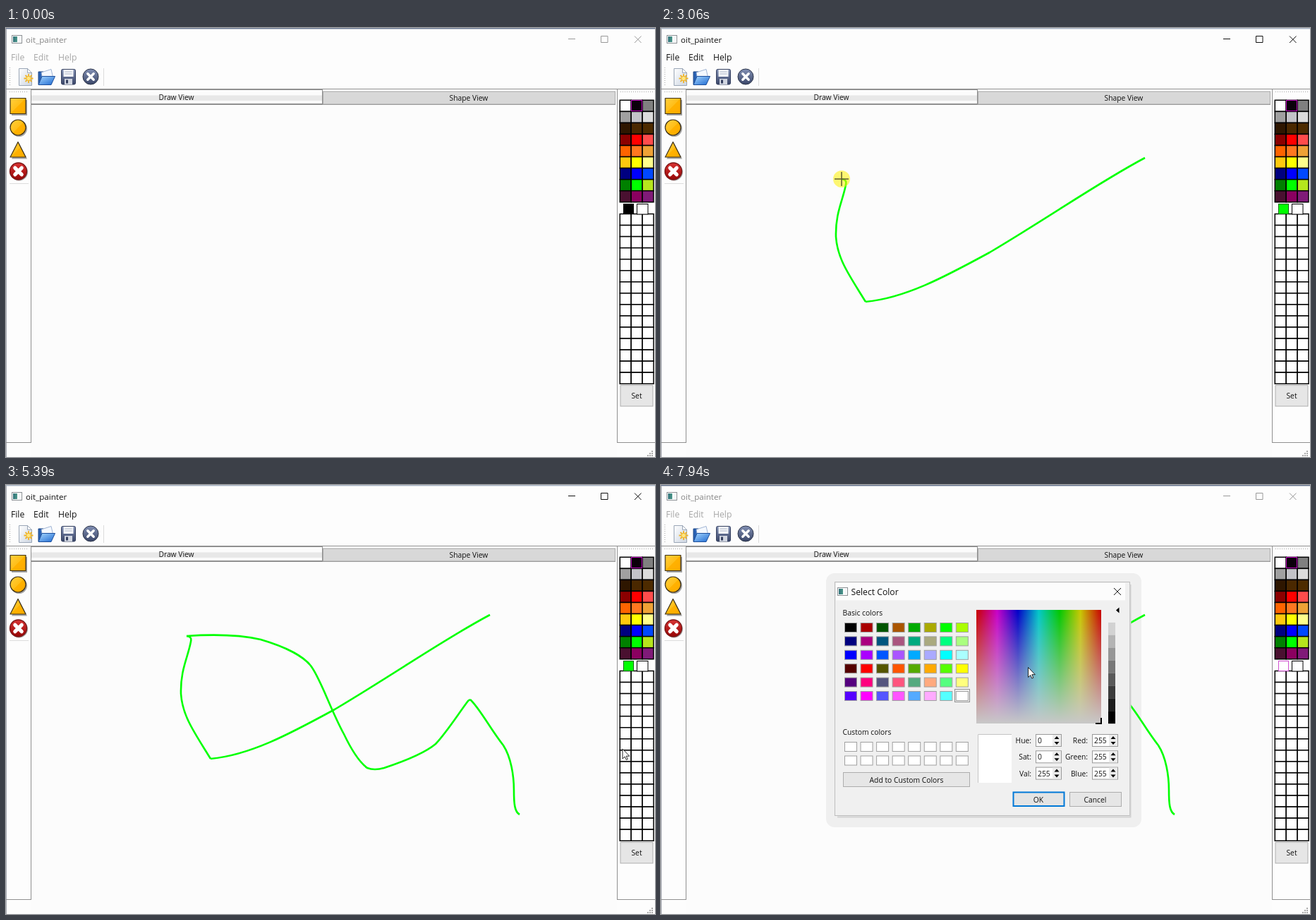
An HTML page for the animation above (8 s loop, 920x608 px).

```html
<!DOCTYPE html>
<html lang="en">
<head>
<meta charset="utf-8">
<title>Painter</title>
<style>
  html, body { margin: 0; width: 100%; height: 100%; overflow: hidden; background: #fdfdfd; }
  svg { display: block; width: 920px; height: 608px; }
  text { font: 10.3px "Open Sans", "Noto Sans", sans-serif; fill: #111; }
  .mid { text-anchor: middle; }
  .end { text-anchor: end; }
  .title { font-size: 11.6px; }
  .menu, .caption { font-size: 12.2px; }
  .chrome { fill: none; stroke: #111; }
  .off .title { fill: #858585; }
  .off .menu { fill: #a6a6a6; }
  .off .chrome { stroke: #999; }
  #edge { fill: #a9b4c4; }
  .off #edge { fill: #66748e; }
  .dots { stroke: #a8a8a8; stroke-dasharray: 1 2; }
  .rule { stroke: #909090; }
  .soft { stroke: #dcdcdc; }
  .btn { fill: #e6e6e6; stroke: #adadad; }
  .hot .btn { fill: #dcecf9; stroke: #3c8fd0; }
</style>
</head>
<body>
<svg id="stage" viewBox="0 0 920 608">
  <defs>
    <linearGradient id="gold" x2="1" y2="1">
      <stop stop-color="#ffd040"/><stop offset=".5" stop-color="#ffbe18"/>
      <stop offset=".5" stop-color="#ffb200"/><stop offset="1" stop-color="#ffaa00"/>
    </linearGradient>
    <linearGradient id="blue" x2="1" y2="1">
      <stop stop-color="#a8d8ff"/><stop offset="1" stop-color="#1c68d0"/>
    </linearGradient>
    <linearGradient id="steel" x2="0" y2="1">
      <stop stop-color="#8290b4"/><stop offset="1" stop-color="#3a4668"/>
    </linearGradient>
    <linearGradient id="paper" x2="1" y2="1">
      <stop stop-color="#fff"/><stop offset="1" stop-color="#ccd5e2"/>
    </linearGradient>
    <linearGradient id="red" x2="0" y2="1">
      <stop stop-color="#d83434"/><stop offset="1" stop-color="#960606"/>
    </linearGradient>
    <linearGradient id="app" x2="1">
      <stop stop-color="#2f6f78"/><stop offset=".55" stop-color="#4f9a8c"/>
      <stop offset=".55" stop-color="#fff"/><stop offset="1" stop-color="#eef2f4"/>
    </linearGradient>
    <linearGradient id="hue">
      <stop stop-color="#c80000"/><stop offset=".1667" stop-color="#c800c8"/>
      <stop offset=".3333" stop-color="#0000c8"/><stop offset=".5" stop-color="#00c8c8"/>
      <stop offset=".6667" stop-color="#00c800"/><stop offset=".8333" stop-color="#c8c800"/>
      <stop offset="1" stop-color="#c80000"/>
    </linearGradient>
    <linearGradient id="fade" x2="0" y2="1">
      <stop stop-color="#c8c8c8" stop-opacity="0"/><stop offset="1" stop-color="#c8c8c8"/>
    </linearGradient>
    <g id="icon">
      <rect x=".5" y=".5" width="14" height="11" fill="#fff" stroke="#8b9094"/>
      <rect x="2" y="2" width="11" height="8" fill="url(#app)"/>
    </g>
  </defs>

  <rect width="920" height="608" fill="#fdfdfd"/>
  <rect x="36" y="110" width="830" height="498" fill="#fcfcfc"/>
  <rect id="edge" width="920" height="1.4"/>
  <path d="M.5 1V608" stroke="#a9adb5"/>

  <use href="#icon" x="8" y="10"/>
  <text class="title" x="28" y="20.800">oit_painter</text>
  <path class="chrome" d="M797 15.500h10M843.500 11.500h9.500v9h-9.500zM891 11.500l9.500 9.500M900.500 11.500l-9.500 9.500"/>
  <text class="menu" x="7" y="46">File</text>
  <text class="menu" x="39" y="46">Edit</text>
  <text class="menu" x="74" y="46">Help</text>

  <path class="dots" d="M5.500 56V83M871 90.500H917M5 90.500H31"/>
  <path class="soft" d="M138.500 57V82M5 220.500H32"/>

  <g stroke-linejoin="round">
    <path d="M18.500 57.500h12l6 6v18h-18z" fill="url(#paper)" stroke="#9aa6b6"/>
    <path d="M30.500 57.500v6h6z" fill="#fff" stroke="#9aa6b6"/>
    <path d="M32 65v13M25.500 71.500h13M27.500 67l9 9M36.500 67l-9 9" stroke="#f0b429" stroke-width="1.800"/>
    <circle cx="32" cy="71.500" r="3.200" fill="#ffe680" stroke="#f0b429"/>

    <path d="M46 80V62h7l2 2h8v5" fill="#2a62b4" stroke="#1d4686"/>
    <path d="M50 63l14-4.500 3 13-15 4z" fill="#f4f8ff" stroke="#8aa3c8" stroke-width=".8"/>
    <path d="M46 80.500l5-12h18.500l-5.500 12z" fill="url(#blue)" stroke="#1d4f9c"/>

    <rect x="78.500" y="58.500" width="20" height="21.500" rx="2" fill="url(#steel)" stroke="#35405f"/>
    <path d="M81.500 59h14v10h-14z" fill="#f2f4f8"/>
    <path d="M83.500 62h10M83.500 65h10" stroke="#b4bccb"/>
    <path d="M83 72h11v8h-11z" fill="#d0d5e0"/>
    <path d="M85 73.500h3v5h-3z" fill="#35405f"/>

    <circle cx="120" cy="69" r="11" fill="url(#steel)" stroke="#2c3448"/>
    <path d="M115.800 64.800l8.400 8.400M124.200 64.800l-8.400 8.400" stroke="#fff" stroke-width="3.400" stroke-linecap="round"/>

    <g fill="#000" opacity=".35">
      <path d="M8 102h22v22h-22zM18.500 163l11.500 22.500H8z"/>
      <circle cx="18.500" cy="142.500" r="11.500"/><circle cx="18.500" cy="204" r="12.500"/>
    </g>
    <g fill="url(#gold)" stroke="#3c3016" stroke-width="1.200">
      <rect x="6" y="99.500" width="22" height="22"/>
      <circle cx="17" cy="141" r="11"/>
      <path d="M17 161.500L28 183H6z"/>
    </g>
    <circle cx="17.500" cy="203" r="12" fill="url(#red)" stroke="#7c1616" stroke-width="1.300"/>
    <path d="M12.800 198.300l9.400 9.400M22.200 198.300l-9.400 9.400" stroke="#fff" stroke-width="5.200" stroke-linecap="round"/>
  </g>

  <path class="rule" d="M0 86.500H920M35.500 86V587M866.500 86V587M0 587.500H36M866 587.500H920M36 108.500H864"/>
  <rect class="rule" x="35.500" y="87.500" width="413" height="20" fill="#fcfcfc"/>
  <rect x="36" y="95.500" width="412" height="7.500" fill="#e8e8e8"/>
  <rect x="449.500" y="90" width="414" height="18" fill="#d8d8d8" stroke="#a8a8a8"/>
  <text class="mid" x="241.500" y="101.500">Draw View</text>
  <text class="mid" x="656" y="103">Shape View</text>
  <path d="M916 599v8M913 602v5M910 605v2" stroke="#a9a9a9" stroke-width="2" stroke-dasharray="2 1"/>

  <g id="palette" stroke="#000" stroke-width="1.500"></g>
  <rect x="886.500" y="102.500" width="15" height="15" fill="#0a000a" stroke="#c000c0"/>
  <rect id="pen" x="875.500" y="249.500" width="14" height="14"/>
  <rect x="894.500" y="249.500" width="15.500" height="14.500" fill="#fff" stroke="#000"/>
  <g id="set">
    <rect class="btn" x="871" y="506.500" width="46" height="29.500"/>
    <text class="mid" x="894" y="525">Set</text>
  </g>

  <rect id="halo" x="234" y="125" width="447" height="360" rx="12" fill="#efefef"/>
  <g id="ink" fill="none" stroke="#0f0" stroke-width="2.600"></g>

  <g id="dialog">
    <rect x="246.500" y="137.500" width="418" height="331" fill="#f0f0f0" stroke="#bdbdbd"/>
    <path d="M665.500 141V470.500H250" fill="none" stroke="#d2d2d2" stroke-width="2"/>
    <rect x="248" y="139" width="410" height="24.500" fill="#fcfcfc"/>
    <use href="#icon" x="250" y="145"/>
    <text class="caption" x="269.500" y="155.500">Select Color</text>
    <path d="M642 146l10 10M652 146l-10 10" stroke="#111"/>
    <text x="257.500" y="185">Basic colors</text>
    <text x="257.500" y="354">Custom colors</text>
    <g id="swatches" stroke="#a0a0a0"></g>
    <rect x="416.500" y="289.500" width="21" height="18" fill="none" stroke="#333" stroke-dasharray="1 1"/>
    <rect class="btn" x="258.500" y="407.500" width="179" height="20"/>
    <text class="mid" x="348" y="421.500">Add to Custom Colors</text>
    <rect x="447" y="177" width="177" height="161" fill="url(#hue)"/>
    <rect x="447" y="177" width="177" height="161" fill="url(#fade)"/>
    <path d="M616 338h9M624 330v9" stroke="#000" stroke-width="2"/>
    <g id="bar"></g>
    <path d="M645 177.500l4.500-4v8z"/>
    <rect x="449" y="353" width="48" height="69" fill="#fff"/>
    <path d="M449.500 422V353.500H497" fill="none" stroke="#c4c4c4"/>
    <g id="fields"></g>
    <rect x="499.500" y="435.500" width="72" height="19.500" fill="#e4e4e4" stroke="#0078d7" stroke-width="2"/>
    <text class="mid" x="535" y="449.500">OK</text>
    <rect class="btn" x="579.500" y="435.500" width="73" height="20"/>
    <text class="mid" x="615.500" y="449.500">Cancel</text>
  </g>

  <g id="pointer">
    <circle id="glow" r="12" fill="#fff000" opacity=".55"/>
    <path id="cross" d="M-10 0H10M0-10V10" stroke="#5c5c30" stroke-width="1.500"/>
    <path id="arrow" d="M.5.500V14.500L3.700 11.500 5.800 16 7.800 15.200 5.800 10.700H10.300Z" fill="#fff" stroke="#111" stroke-width=".9"/>
  </g>
</svg>
<script>
const $ = id => document.getElementById(id);
const LOOP = 8000, STEP = 111.2, PHASE = 2045 % STEP;
const ACTIVE = 1170, CLEARED = 5610, OPEN = 7260, SHOWN = 7380;

const rect = (x, y, w, h, fill, more = '') =>
  `<rect x="${x}" y="${y}" width="${w}" height="${h}" fill="${fill}" ${more}/>`;
const repeat = (n, make) => Array.from({ length: n }, (_, i) => make(i)).join('');

// side palette: nine coloured rows, then fifteen empty ones
const paints = ('#fff #000 #808080 #a0a0a0 #c3c3c8 #dcdcdc #2e1600 #4a2800 #4d2b00 ' +
  '#8b0000 #f00 #ff4c4c #ff6400 #ff7820 #eea236 #ffc90e #ff0 #ffff8c ' +
  '#000080 #00f #0048ff #008000 #0f0 #b5e61d #4a1030 #8b0060 #801a78').split(' ');
const cell = (i, top, fill) =>
  rect(870.3 + i % 3 * 15.9, top + Math.floor(i / 3) * 16.05, 15.9, 16.05, fill);
$('palette').innerHTML =
  paints.map((c, i) => cell(i, 102.3, c)).join('') + repeat(45, i => cell(i, 263.5, '#fff'));

// dialog colours run down the columns: blue fastest, then red, then green
const chip = (col, y, fill) => rect(260.5 + col * 22.55, y, 17, 13, fill);
$('swatches').innerHTML = repeat(48, i => {
  const b = i % 3 * 127.5, r = Math.floor(i / 3) % 4 * 85, g = Math.floor(i / 12) * 85;
  return chip(Math.floor(i / 6), 195.5 + i % 6 * 19.4, `rgb(${r},${g},${Math.floor(b)})`);
}) + repeat(16, i => chip(i % 8, 364.5 + Math.floor(i / 8) * 19.5, '#fff'));

$('bar').innerHTML = repeat(9, i => {
  const v = Math.round(240 * (1 - i / 8));
  return rect(634, 177 + i * 17.9, 10, 18, `rgb(${v},${v},${v})`);
});

const field = (label, value, x, y) =>
  `<text class="end" x="${x - 6}" y="${y + 4}">${label}:</text>` +
  rect(x + .5, y - 8.5, 36, 17, '#fff', 'stroke="#9a9a9a"') +
  rect(x + 24, y - 8, 12, 16, '#ececec') +
  `<text x="${x + 3}" y="${y + 4}">${value}</text>` +
  `<path d="M${x + 26.5} ${y - 2}l3.500-4 3.500 4zM${x + 26.5} ${y + 2}l3.500 4 3.500-4z"/>`;
$('fields').innerHTML = [['Hue', 0, 'Red'], ['Sat', 0, 'Green'], ['Val', 255, 'Blue']]
  .map(([a, v, b], i) => field(a, v, 531, 362 + i * 23.3) + field(b, 255, 611, 362 + i * 23.3))
  .join('');

// each pointer move eases along one curve; moves with ink leave it behind as a line
function move(start, end, d, ink = false) {
  const path = document.createElementNS('http://www.w3.org/2000/svg', 'path');
  path.setAttribute('d', d);
  if (ink) $('ink').append(path);
  return { start, end, path, ink, length: path.getTotalLength() };
}
const moves = [
  move(100, 740, 'M848 498C876 420 915 250 905 188L904 218'),
  move(1060, 1170, 'M904 218L896 223'),
  move(1280, 1940, 'M896 223C850 235 780 238 727 238S690 215 686 184'),
  move(2045, 2529, 'M686 184C620 219 560 262 466 318C400 354 345 383 290 388', true),
  move(2529, 2940, 'M290 388C268 352 250 328 248 296C247 262 258 244 262 222C263 217 262 215 256 214', true),
  move(3045, 3950, 'M256 214C300 211 335 213 361 219C395 229 424 243 434 259' +
    'C448 280 460 318 479 353C490 376 500 392 512 401Q522 405 536 401' +
    'C566 391 596 378 609 367C625 350 640 326 655 306L658 304', true),
  move(3950, 4403, 'M658 304C672 317 686 345 705 369C716 386 720 412 720 433C720 452 721 463 728 467', true),
  move(4500, 4600, 'M728 467L744 465'),
  move(4650, 5170, 'M744 465C810 450 860 390 868 315'),
  move(5170, 5380, 'M868 315L873.500 373.500'),
  move(5900, 6040, 'M873 373L877 365'),
  move(6400, 6930, 'M877 365L889 527'),
  move(SHOWN, 7920, 'M889 527C800 500 700 400 520 258'),
];
const presses = [[1170, 1390], [1940, 4500], [5610, 5730], [6050, 6270], [7040, 7150]];

const within = (t, a, b) => t >= a && t < b;
const show = (id, on) => $(id).setAttribute('visibility', on ? 'inherit' : 'hidden');
const ease = p => p * p * (3 - 2 * p);
const travelled = (m, t) =>
  m.length * ease(Math.min(1, Math.max(0, (t - m.start) / (m.end - m.start))));

function render(t) {
  const sampled = Math.floor((t - PHASE) / STEP + .05) * STEP + PHASE;
  for (const m of moves.filter(m => m.ink)) {
    const done = travelled(m, sampled);
    m.path.setAttribute('stroke-dasharray', `${done} 2000`);
    m.path.setAttribute('visibility', done > 0 ? 'visible' : 'hidden');
  }

  const now = moves.filter(m => m.start <= sampled).pop();
  const { x, y } = now ? now.path.getPointAtLength(travelled(now, sampled)) : { x: -50, y: -50 };
  const open = t >= OPEN;
  const cross = x < 866 && within(t, ACTIVE, OPEN);
  $('pointer').setAttribute('transform', `translate(${x} ${y})`);
  show('cross', cross);
  show('arrow', !cross);
  show('glow', presses.some(p => within(t, ...p)));

  $('stage').setAttribute('class', t < ACTIVE || open ? 'off' : '');
  $('set').setAttribute('class', within(t, 6830, SHOWN) ? 'hot' : '');
  const [fill, rim] = t >= CLEARED ? ['#fff', '#d050d0'] : t >= ACTIVE ? ['#0f0', '#0a6a0a'] : ['#000', '#000'];
  $('pen').setAttribute('fill', fill);
  $('pen').setAttribute('stroke', rim);
  show('halo', open);
  show('dialog', open);
  $('dialog').setAttribute('opacity', t < SHOWN ? .45 : 1);
}

function tick() {
  render(performance.now() % LOOP);
  requestAnimationFrame(tick);
}
tick();
</script>
</body>
</html>
```
